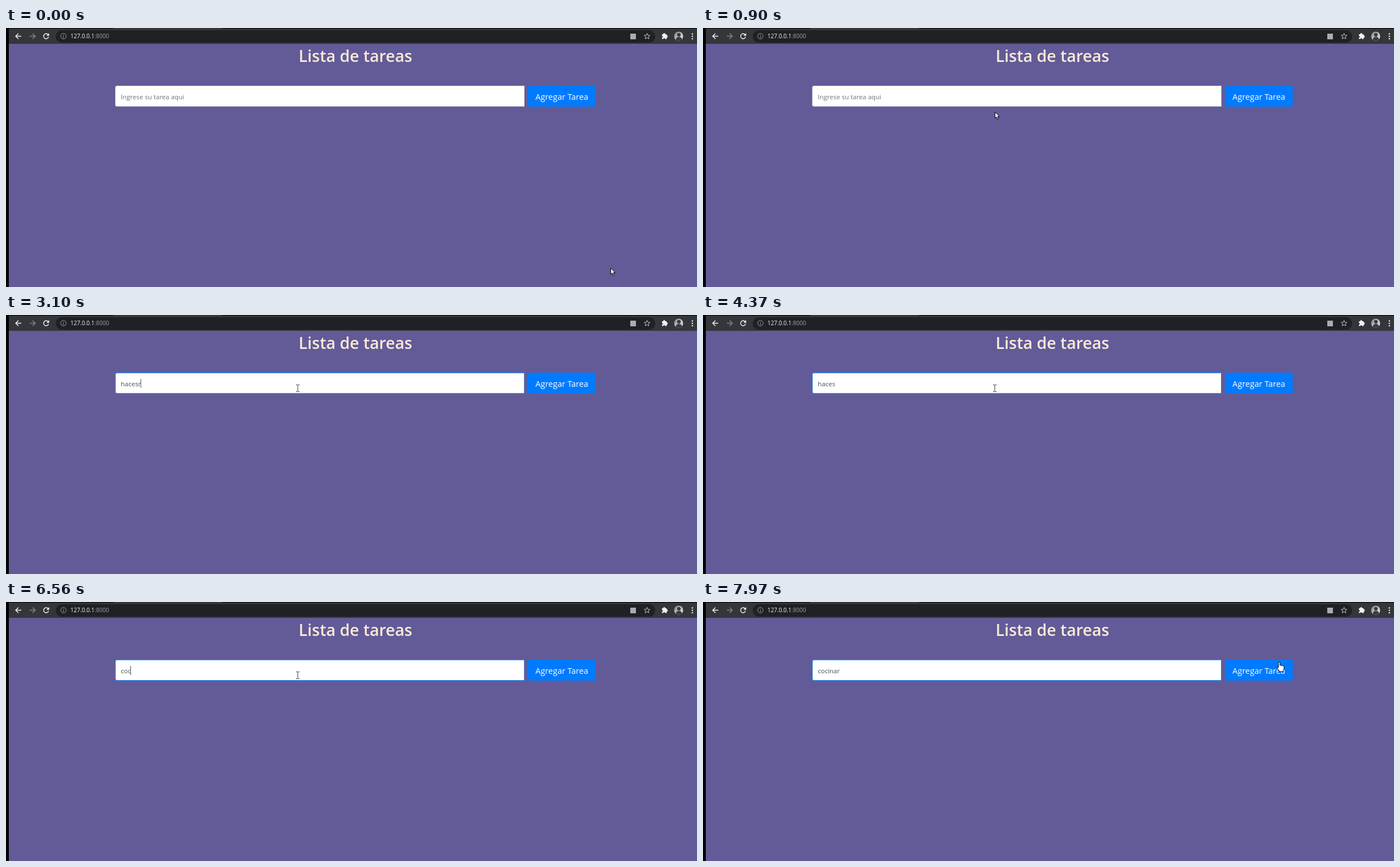
An HTML page with a canvas for the animation above (8 s loop, 1222x458 px).

```html
<!DOCTYPE html>
<html lang="es">
<head>
<meta charset="utf-8">
<title>Lista de tareas</title>
<style>
  html, body { margin: 0; width: 100%; height: 100%; overflow: hidden; background: #000; }
  canvas { display: block; width: 1222px; height: 458px; }
</style>
</head>
<body>
<canvas id="stage" width="1222" height="458"></canvas>
<script>
const ctx = document.getElementById('stage').getContext('2d');
const LOOP = 8000;
const FONT = '"Open Sans", "Noto Sans", sans-serif';
const INPUT_FONT = '11.5px ' + FONT;
const TEXT_X = 203;

// [time, x, y] of the pointer tip
const POINTER = [
  [160, 1069, 424], [260, 985, 411], [350, 870, 386], [450, 742, 342],
  [570, 612, 260], [670, 560, 231], [760, 532, 180], [860, 518, 151],
  [960, 514, 143], [990, 514, 143], [1080, 516, 129], [7460, 516, 129],
  [7490, 517, 129], [7590, 600, 126], [7690, 755, 117], [7790, 895, 109],
  [7880, 990, 103], [7940, 1023, 100], [7970, 1019, 106]
];

// [time, content of the field]
const TYPING = [
  [0, ''], [2710, 'h'], [2770, 'ha'], [2820, 'hac'], [2870, 'hace'],
  [3030, 'haces'], [3100, 'hacesr'], [3300, 'hacesr '], [3680, 'hacesr'],
  [3760, 'haces'], [4520, 'hace'], [5040, 'ha'], [5090, 'h'], [5140, ''],
  [5940, 'c'], [6010, 'co'], [6560, 'coc'], [6650, 'coci'],
  [6810, 'cocin'], [6930, 'cocina'], [7040, 'cocinar']
];

const CARET_OFF = [[0, 1290], [1840, 2330], [4370, 4520], [4880, 5400], [7540, LOOP]];
const inside = (t, [from, to]) => t >= from && t < to;

function pointerAt(t) {
  const next = POINTER.findIndex(p => p[0] > t);
  if (next === 0) return POINTER[0].slice(1);
  if (next < 0) return POINTER[POINTER.length - 1].slice(1);
  const [t0, x0, y0] = POINTER[next - 1], [t1, x1, y1] = POINTER[next];
  const k = (t - t0) / (t1 - t0);
  return [Math.round(x0 + (x1 - x0) * k), Math.round(y0 + (y1 - y0) * k)];
}

function rect(x, y, w, h, color) {
  ctx.fillStyle = color;
  ctx.fillRect(x, y, w, h);
}

function rounded(x, y, w, h, radius, color) {
  ctx.beginPath();
  ctx.roundRect(x, y, w, h, radius);
  ctx.fillStyle = color;
  ctx.fill();
}

function circle(x, y, r, color) {
  ctx.beginPath();
  ctx.arc(x, y, r, 0, Math.PI * 2);
  ctx.fillStyle = color;
  ctx.fill();
}

function line(points, color, width = 1, close = false) {
  ctx.beginPath();
  points.forEach(([x, y]) => ctx.lineTo(x, y));
  if (close) ctx.closePath();
  ctx.strokeStyle = color;
  ctx.lineWidth = width;
  ctx.stroke();
}

function text(str, x, y, font, color, align = 'left') {
  ctx.font = font;
  ctx.textAlign = align;
  ctx.fillStyle = color;
  ctx.fillText(str, x, y);
}

function navArrow(x, dir, color) {
  line([[x - 5 * dir, 14.5], [x + 5 * dir, 14.5]], color, 1.5);
  line([[x, 9.7], [x + 4.8 * dir, 14.5], [x, 19.3]], color, 1.5);
}

function drawReload() {
  ctx.beginPath();
  ctx.arc(71, 14.5, 4.4, -0.75, Math.PI * 1.9 - 0.2, true);
  ctx.arc(71, 14.5, 4.4, 0.35, Math.PI * 1.75);
  ctx.strokeStyle = '#f1f3f4';
  ctx.lineWidth = 1.5;
  ctx.beginPath();
  ctx.arc(71, 14.5, 4.4, 0.3, Math.PI * 1.75);
  ctx.stroke();
  ctx.beginPath();
  ctx.moveTo(76.3, 9);
  ctx.lineTo(76.3, 13.8);
  ctx.lineTo(71.5, 13.8);
  ctx.fillStyle = '#f1f3f4';
  ctx.fill();
}

function drawStar(x, y) {
  const points = Array.from({ length: 10 }, (_, i) => {
    const r = i % 2 ? 2.4 : 5.4, a = i * Math.PI / 5 - Math.PI / 2;
    return [x + r * Math.cos(a), y + r * Math.sin(a)];
  });
  line(points, '#c4c7ca', 1, true);
}

function drawPuzzle() {
  rounded(1160, 11, 8.5, 8.5, 1, '#f1f3f4');
  circle(1164, 10.8, 1.8, '#f1f3f4');
  circle(1168.6, 15, 1.8, '#f1f3f4');
  circle(1160.3, 15.6, 1.4, '#35363a');
  circle(1164, 19.3, 1.4, '#35363a');
}

function drawAvatar() {
  ctx.save();
  ctx.beginPath();
  ctx.arc(1189.5, 14.5, 8, 0, Math.PI * 2);
  ctx.clip();
  const shade = ctx.createLinearGradient(1181, 7, 1198, 22);
  shade.addColorStop(0, '#77777a');
  shade.addColorStop(0.5, '#c2c2c4');
  shade.addColorStop(1, '#e0e0e2');
  rect(1181, 6, 17, 17, shade);
  circle(1190, 12, 3.2, '#3c3c3f');
  circle(1190, 21, 5.5, '#3c3c3f');
  ctx.restore();
}

function drawBrowser() {
  rect(0, 0, 1222, 458, '#000');
  rect(5, 1, 1217, 27, '#35363a');
  rect(190, 0, 192, 1, '#35363a');
  rounded(88, 4, 1060, 22, 11, '#202124');
  navArrow(22, -1, '#f1f3f4');
  navArrow(47, 1, '#858689');
  drawReload();

  ctx.beginPath();
  ctx.arc(101.5, 14.5, 4.8, 0, Math.PI * 2);
  ctx.strokeStyle = '#9aa0a6';
  ctx.lineWidth = 1;
  ctx.stroke();
  rect(101, 14, 1, 3.5, '#9aa0a6');
  rect(101, 12, 1, 1, '#9aa0a6');

  const urlFont = '10.05px ' + FONT, host = '127.0.0.1';
  text(host, 114, 18, urlFont, '#f1f3f4');
  text(':8000', 114 + ctx.measureText(host).width, 18, urlFont, '#9aa0a6');

  rect(1104, 10, 10, 10, '#a9acb0');
  drawStar(1133.7, 14.8);
  drawPuzzle();
  drawAvatar();
  for (const y of [10.5, 14.7, 18.9]) circle(1213.8, y, 1.25, '#f1f3f4');
}

function drawPage() {
  rect(5, 28, 1217, 430, '#625b98');
  text('Lista de tareas', 618, 60, '600 28.6px ' + FONT, '#faebd7', 'center');
  rounded(923, 102, 120, 37, 3.8, '#007bff');
  text('Agregar Tarea', 983, 127, '14.5px ' + FONT, '#fff', 'center');
}

function drawField(t) {
  const focus = Math.max(0, Math.min(1, (t - 1290) / 190));
  const corners = [3.5, 0, 0, 3.5];
  rounded(193, 102, 724, 37, corners, '#ced4da');
  if (focus > 0) {
    ctx.globalAlpha = focus;
    rounded(193, 101.5, 724, 38, corners, '#2f86ee');
    ctx.globalAlpha = 1;
  }
  rounded(194, 103, 722, 35, [2.5, 0, 0, 2.5], '#fff');

  const value = TYPING.filter(([at]) => at <= t).pop()[1];
  if (value) text(value, TEXT_X, 125.5, INPUT_FONT, '#495057');
  else text('Ingrese su tarea aqui', TEXT_X, 125.5, INPUT_FONT, '#6c757d');

  const width = ctx.measureText(value).width;
  if (inside(t, [3330, 3760])) drawSquiggle(ctx.measureText(value.trim()).width);
  if (!CARET_OFF.some(span => inside(t, span))) {
    rect(Math.floor(TEXT_X + (value ? width - 0.4 : 0)), 113, 1, 16, '#495057');
  }
}

function drawSquiggle(width) {
  const points = [];
  for (let x = 0; x <= width; x += 2) points.push([TEXT_X + x, 127 + (x / 2 % 2) * 1.5]);
  line(points, '#e8746c', 0.9);
}

function cursorShape(x, y, path) {
  ctx.save();
  ctx.translate(x, y);
  const shape = new Path2D(path);
  ctx.lineJoin = 'round';
  ctx.lineWidth = 1;
  ctx.fillStyle = '#fff';
  ctx.fill(shape);
  ctx.strokeStyle = '#000';
  ctx.stroke(shape);
  ctx.restore();
}

function drawBeam(x, y) {
  rect(x - 0.5, y - 5, 1, 11, '#333');
  for (const edge of [y - 6, y + 6]) {
    rect(x - 3, edge, 2.5, 1, '#333');
    rect(x + 0.5, edge, 2.5, 1, '#333');
  }
}

function drawPointer(t) {
  const [x, y] = pointerAt(t);
  const inRow = y >= 102 && y < 139;
  if (inRow && x >= 193 && x < 917) {
    drawBeam(x, y);
  } else if (inRow && x >= 923 && x < 1043) {
    cursorShape(x, y, 'M-1.3 .8Q0-.8 1.3.8V6Q3 5 4 6.4Q6 5.6 6.6 7Q8.4 6.6 8.4 8.6V12Q8.4 14 7 15.4V17H-.2V15.4L-4 10.4Q-4.4 8.2-2.6 8.8L-1.3 10.3Z');
  } else {
    cursorShape(x, y, 'M.5.5V11.6L3 9.3L4.8 13.4L6.6 12.6L4.9 8.7H8.2Z');
  }
}

const start = performance.now();

function render(now) {
  const t = Math.max(0, now - start) % LOOP;
  drawBrowser();
  drawPage();
  drawField(t);
  drawPointer(t);
  requestAnimationFrame(render);
}

render(start);
</script>
</body>
</html>
```
